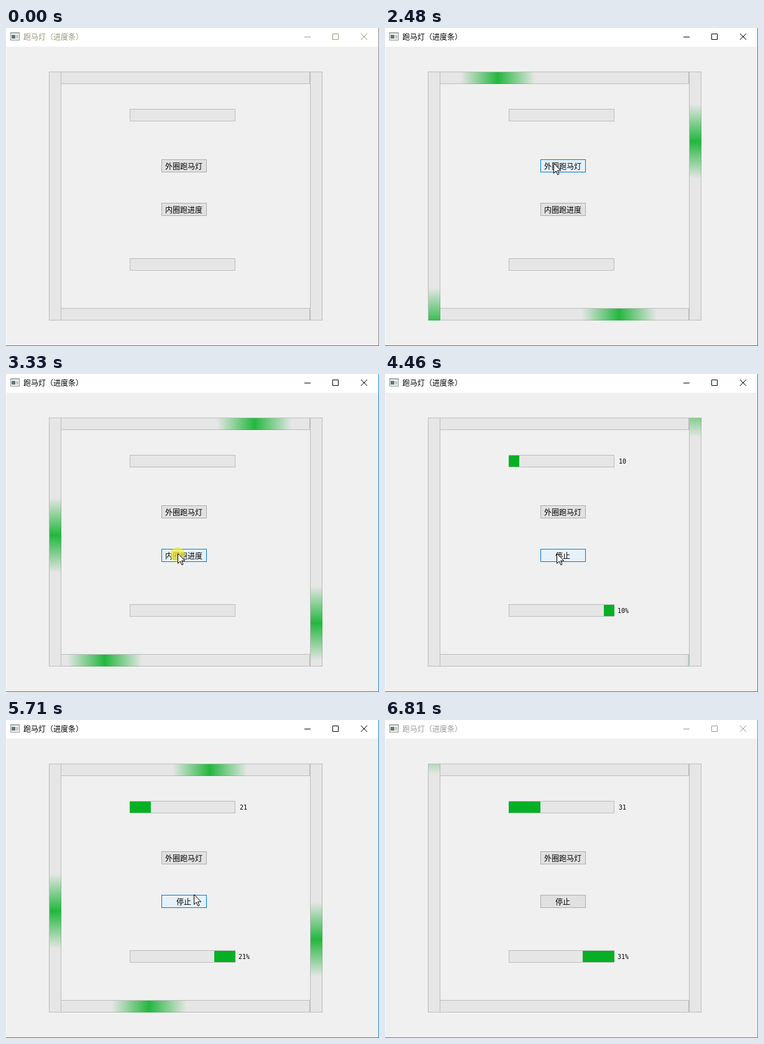
Write an HTML page that moves like this. It is 600 px wide and 511 px high and loops after 6.94 s.

```html
<!DOCTYPE html>
<html lang="zh-CN">
<head>
<meta charset="utf-8">
<style>
html, body { margin: 0; width: 100%; height: 100%; overflow: hidden; background: #f0f0f0; }
svg { display: block; }
text { font: 12px "Noto Sans CJK SC", "Noto Sans CJK", sans-serif; }
.mid { text-anchor: middle; }
.num { font: 10px "DejaVu Sans Mono", monospace; text-anchor: middle; }
.bar { fill: #e6e6e6; stroke: #bcbcbc; }
.chunk { fill: #06b025; }
.btn { fill: #e1e1e1; stroke: #adadad; }
.btn.hover { fill: #e5f1fb; stroke: #0078d7; }
.caption { fill: none; stroke: currentColor; }
#pulse { fill: #f5ee30; opacity: .7; }
</style>
</head>
<body>
<svg width="600" height="511" viewBox="0 0 600 511">
  <defs>
    <linearGradient id="gh">
      <stop offset="0" stop-color="#06b025" stop-opacity="0"/>
      <stop offset=".5" stop-color="#06b025" stop-opacity=".87"/>
      <stop offset="1" stop-color="#06b025" stop-opacity="0"/>
    </linearGradient>
    <linearGradient id="gv" href="#gh" x1="0" y1="0" x2="0" y2="1"/>
  </defs>

  <rect width="600" height="511" fill="#f0f0f0"/>
  <rect width="600" height="30" fill="#fff"/>
  <rect y="30" width="1" height="480" fill="#fafafa"/>
  <rect id="side" x="599" width="1" height="511"/>
  <rect id="base" y="510" width="600" height="1"/>

  <rect x="7.5" y="7.5" width="14" height="12" fill="#f4f6f6" stroke="#8d9494"/>
  <path d="M8 8.5H21" stroke="#b4bcbc"/>
  <rect x="9" y="11" width="6" height="6" fill="#667575"/>
  <rect x="16" y="11" width="4" height="6" fill="#c3cbcb"/>

  <g id="title">
    <text x="28" y="18.5" fill="currentColor">跑马灯（进度条）</text>
    <path class="caption" d="M480 14.5H490M525.5 9.5H534.5V18.5H525.5Z"/>
    <path class="caption" d="M571 9L581 19M581 9L571 19"/>
  </g>

  <rect class="bar" x="69.5" y="70.5" width="419" height="19"/>
  <svg x="70" y="71" width="419" height="19"><rect id="top" width="120" height="19" fill="url(#gh)"/></svg>
  <rect class="bar" x="69.5" y="450.5" width="419" height="19"/>
  <svg x="70" y="451" width="419" height="19"><rect id="bottom" width="120" height="19" fill="url(#gh)"/></svg>
  <rect class="bar" x="69.5" y="70.5" width="19" height="399"/>
  <svg x="70" y="71" width="19" height="399"><rect id="left" width="19" height="120" fill="url(#gv)"/></svg>
  <rect class="bar" x="489.5" y="70.5" width="19" height="399"/>
  <svg x="490" y="71" width="19" height="399"><rect id="right" width="19" height="120" fill="url(#gv)"/></svg>

  <rect class="bar" x="199.5" y="130.5" width="169" height="19"/>
  <rect class="chunk" id="fill1" x="199" y="131" height="18"/>
  <text class="num" id="num1" x="382" y="144"></text>
  <rect class="bar" x="199.5" y="370.5" width="169" height="19"/>
  <rect class="chunk" id="fill2" y="371" height="18"/>
  <text class="num" id="num2" x="383" y="384"></text>

  <rect class="btn" id="outer" x="250.5" y="211.5" width="72" height="20"/>
  <text class="mid" x="286" y="226.5">外圈跑马灯</text>
  <rect class="btn" id="inner" x="250.5" y="281.5" width="72" height="20"/>
  <text class="mid" id="label" x="286" y="296.5"></text>

  <circle id="pulse" r="11.5"/>
  <path id="cursor" d="M.5 .5V16.5L4.2 12.9 6.8 18.8 9 17.8 6.5 12.1H11.7Z" fill="#fff" stroke="#000"/>
</svg>
<script>
const LOOP = 6940, STEPS = 56, STEP = LOOP / STEPS;
const OUTER_START = 1793, INNER_START = 3346;

// pointer moves; it rests in between
const entry = { x: 415, y: 442 };
const moves = [
  { from: 120, to: 740, x: 276, y: 213 },
  { from: 950, to: 1240, x: 276, y: 288 },
  { from: 1360, to: 1610, x: 271, y: 217 },
  { from: 2850, to: 3220, x: 276, y: 288 },
  { from: 5450, to: 5700, x: 302, y: 280 },
  { from: 5700, to: 6440, x: 575, y: 515 },
];

const $ = id => document.getElementById(id);
const set = (id, attrs) => {
  for (const k in attrs) $(id).setAttribute(k, attrs[k]);
};
const show = (id, on) => set(id, { visibility: on ? 'visible' : 'hidden' });

function pointer(t) {
  let { x, y } = entry;
  for (const m of moves) {
    const f = Math.min(1, Math.max(0, (t - m.from) / (m.to - m.from)));
    const ease = Math.sin(f * Math.PI / 2);
    x += (m.x - x) * ease;
    y += (m.y - y) * ease;
  }
  return { x: Math.round(x), y: Math.round(y) };
}

function button(id, top, p) {
  const hover = p.x >= 250 && p.x < 323 && p.y >= top && p.y < top + 22;
  set(id, { class: hover ? 'btn hover' : 'btn' });
}

function marquee(t) {
  const run = Math.max(0, t - OUTER_START) * 0.2515;
  const h = run % 664 - 60, v = run % 640 - 60;
  set('top', { x: h - 61 });
  set('bottom', { x: 359 - h });
  set('right', { y: v - 61 });
  set('left', { y: 459 - v });
  for (const id of ['top', 'bottom', 'left', 'right']) show(id, t > OUTER_START);
}

function progress(t) {
  const on = t > INNER_START + STEP / 2;
  const n = on ? Math.floor((t - INNER_START) / 110.5) : 0;
  const width = Math.round(1.7 * (n - n % 2));   // bars repaint every second percent
  set('fill1', { width });
  set('fill2', { x: 369 - width, width });
  $('num1').textContent = on ? n : '';
  $('num2').textContent = on ? n + '%' : '';
  $('label').textContent = on ? '停止' : '内圈跑进度';
}

function draw(t) {
  const active = t > 1730 && t < 6560;
  set('title', { color: active ? '#000' : t < 1730 ? '#97977c' : '#999' });
  set('side', { fill: active ? '#1883d7' : '#888' });
  set('base', { fill: active ? '#1883d7' : '#4a9a2a' });
  marquee(t);
  progress(t);

  const late = pointer(t - STEP);   // hover fades behind the pointer
  button('outer', 211, late);
  button('inner', 280, late);

  const p = pointer(t);
  set('cursor', { transform: `translate(${p.x} ${p.y})` });
  show('cursor', t > 100 && t < 6500);
  set('pulse', { cx: p.x, cy: p.y + 2 });
  show('pulse', [1735, INNER_START].some(click => Math.abs(t - click) < STEP / 2));
}

const start = performance.now();
function loop() {
  const t = (performance.now() - start) % LOOP;
  // each refresh appears slightly ahead of its nominal time
  draw(STEP * Math.min(STEPS - 1, Math.floor((t + 17) / STEP)));
  requestAnimationFrame(loop);
}
loop();
</script>
</body>
</html>
```
